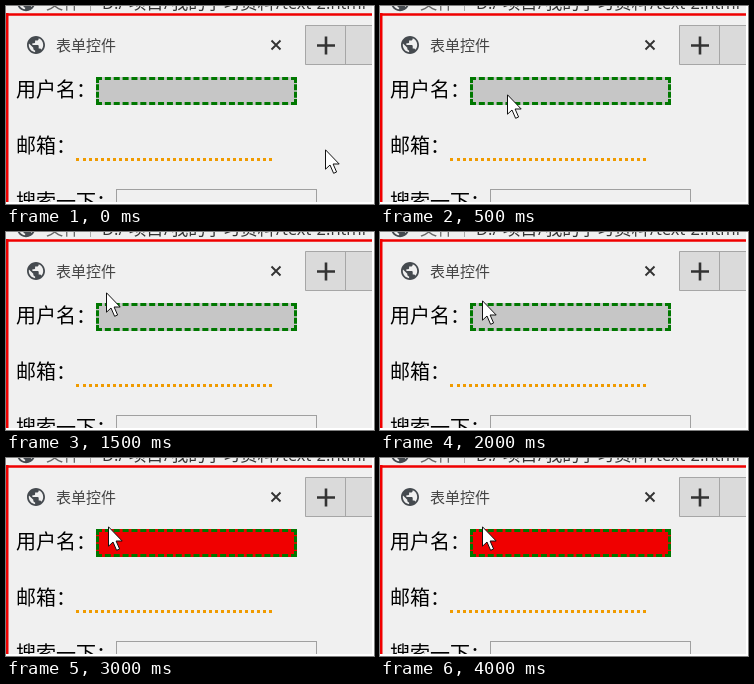
An HTML page for the animation above (4.5 s loop, 368 px wide and 198 px high).

```html
<!DOCTYPE html>
<html lang="zh-CN">
<head>
<meta charset="utf-8">
<title>表单控件</title>
<style>
  html, body { margin: 0; width: 100%; height: 100%; overflow: hidden; background: #fff; }
  .screen { position: absolute; left: 0; top: 0; width: 366px; height: 196px; overflow: hidden; background: #f0f0f0; }
  .screen > * { position: absolute; box-sizing: border-box; }
  svg { left: 0; top: 0; width: 366px; height: 196px; }
  text { font-family: "Noto Sans CJK SC", "Noto Sans CJK", sans-serif; }
  .address { font-size: 17.3px; fill: #333; }
  .latin { font-family: "Open Sans", sans-serif; font-size: 16.5px; }
  .label { font-size: 20px; fill: #000; }
  .name { left: 90px; top: 71px; width: 201px; height: 28px; border: 3px dashed #007800; background: #c6c6c6; animation: focus 4.5s step-end infinite; }
  .mail { left: 70px; top: 127px; width: 196px; height: 28px; border-bottom: 3px dotted #f09b00; }
  .search { left: 110px; top: 183px; width: 201px; height: 28px; border: 1px solid #a0a0a0; }
  .caret { left: 93px; top: 76px; width: 1px; height: 19px; background: #000; animation: blink 4.5s step-end infinite; }
  .pointer { width: 15px; height: 25px; animation: move 4.5s step-end infinite; }

  @keyframes move {
    0% { transform: translate(319px, 143px); }
    11.111% { transform: translate(127px, 88px); }
    22.222% { transform: translate(112px, 65px); }
    33.333% { transform: translate(100px, 60px); }
    44.444%, 100% { transform: translate(102px, 68px); }
  }
  @keyframes focus {
    0% { background: #c6c6c6; }
    55.555%, 100% { background: #f00000; }
  }
  @keyframes blink {
    0%, 66.666%, 88.888%, 100% { opacity: 0; }
    55.555%, 77.777% { opacity: 1; }
  }
</style>
</head>
<body>
<div class="screen">
  <svg viewBox="0 0 366 196">
    <defs>
      <path id="globe" d="M12 2C6.48 2 2 6.48 2 12s4.48 10 10 10 10-4.48 10-10S17.52 2 12 2zm-1 17.93c-3.95-.49-7-3.85-7-7.93 0-.62.08-1.21.21-1.79L9 15v1c0 1.1.9 2 2 2v1.93zm6.9-2.54c-.26-.81-1-1.39-1.9-1.39h-1v-3c0-.55-.45-1-1-1H8v-2h2c.55 0 1-.45 1-1V7h2c1.1 0 2-.9 2-2v-.41c2.93 1.19 5 4.06 5 7.41 0 2.08-.8 3.97-2.1 5.39z" fill="#454a4f"/>
    </defs>

    <!-- address bar -->
    <use href="#globe" transform="translate(9 -15) scale(.92)"/>
    <g class="address">
      <text x="40" y="3" fill="#666">文件</text>
      <text class="latin" x="96" y="3">D:/</text>
      <text x="123" y="3">项目</text>
      <text class="latin" x="158" y="3">/</text>
      <text x="165" y="3">我的学习资料</text>
      <text class="latin" x="270" y="3">/text-2.html</text>
    </g>
    <path d="M84.5 0V5" stroke="#aaa"/>
    <path d="M0 8.5H366M1.25 7V196" stroke="#f00000" stroke-width="2.5"/>

    <!-- tab strip -->
    <use href="#globe" transform="translate(19.2 28.2) scale(.9)"/>
    <text x="50" y="45" font-size="15" fill="#444">表单控件</text>
    <path d="M265.5 34.5l9 9m0-9l-9 9" stroke="#333" stroke-width="1.9"/>
    <path d="M299 19H366V59H299z" fill="#dadada"/>
    <path d="M366 19.5H299.5V58.5H366M339.5 19V59" fill="none" stroke="#a6a6a6"/>
    <path d="M311 39.5H329M320 30.5V48.5" stroke="#333" stroke-width="2.6"/>

    <!-- form labels -->
    <g class="label">
      <text x="10" y="90.5">用户名：</text>
      <text x="10" y="146.5">邮箱：</text>
      <text x="10" y="202.5">搜索一下：</text>
    </g>
  </svg>

  <div class="name"></div>
  <div class="mail"></div>
  <div class="search"></div>
  <div class="caret"></div>
  <svg class="pointer" viewBox="0 0 15 25">
    <path d="M.5 .8V20.2L5 16L8.6 24.3L11.6 23L8.1 15H14.2z" fill="#fff" stroke="#111"/>
  </svg>
</div>
</body>
</html>
```
